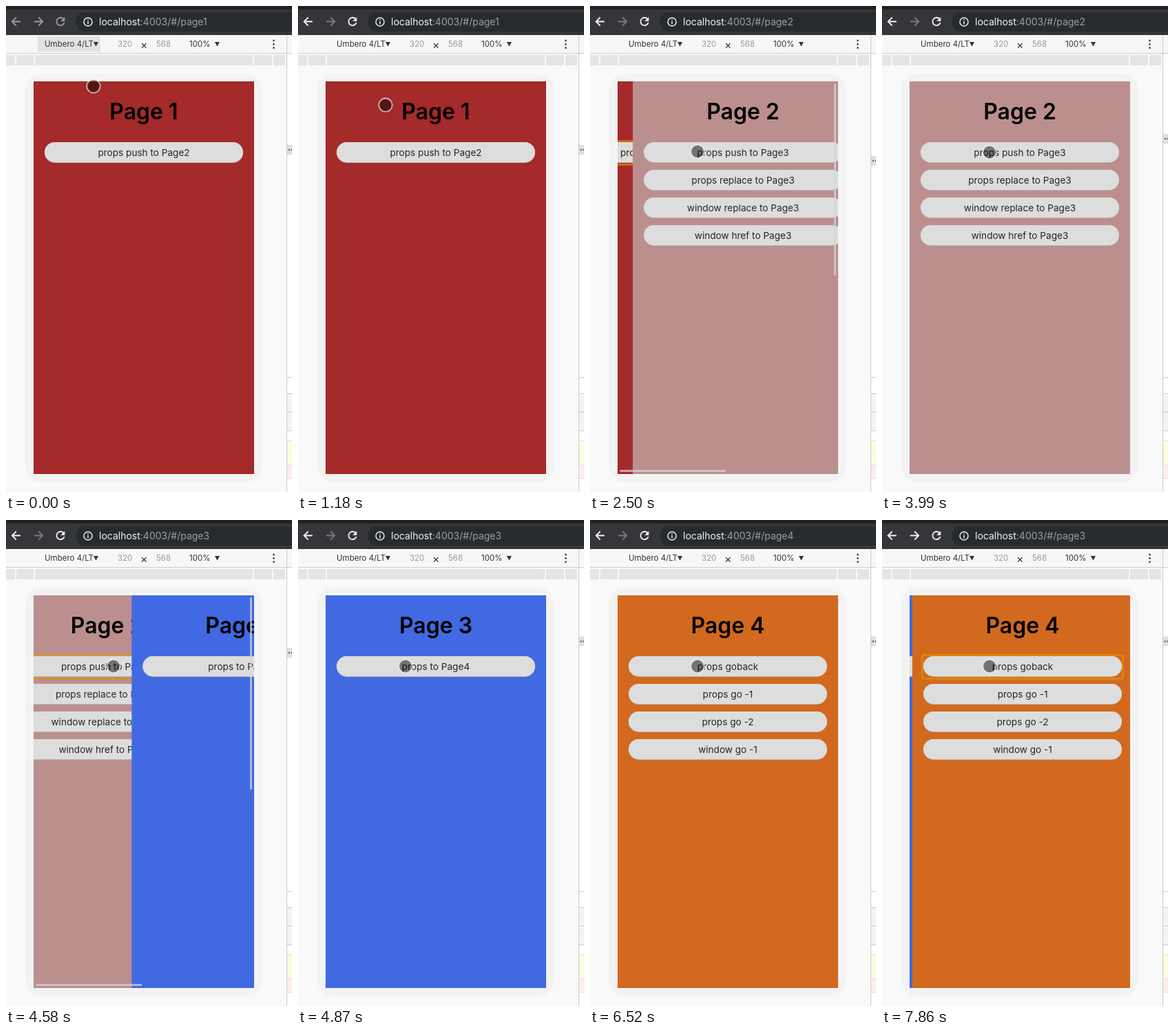
An HTML page that plays this animation: 415x703 px, repeating every 8000 ms.

```html
<!DOCTYPE html>
<html lang="en">
<head>
<meta charset="utf-8">
<title>Page transitions</title>
<style>
  html, body { margin: 0; width: 100%; height: 100%; overflow: hidden; background: #f9f9f9; }
  svg { display: block; width: 415px; height: 703px; font-family: Inter, "Open Sans", sans-serif; }
  .icon { fill: none; stroke: currentColor; stroke-width: 1.8; }
  .url { font-size: 14px; fill: #f1f3f4; }
  .url .path { fill: #9aa0a6; }
  .bar { font-size: 11.5px; fill: #333; }
  .bar .dim { fill: #9a9a9a; }
  h1, .title { font-size: 32px; font-weight: 600; text-anchor: middle; }
  .label { font-size: 13.6px; text-anchor: middle; fill: #262626; }
  .ring { fill: none; stroke: #e59700; stroke-opacity: .62; stroke-width: 3; }
</style>
</head>
<body>
<svg viewBox="0 0 415 703">
  <defs><clipPath id="screen"><rect x="40" y="109" width="320" height="568"/></clipPath></defs>

  <!-- browser toolbar -->
  <rect width="415" height="42" fill="#35363a"/>
  <rect width="415" height="5" fill="#202124"/>
  <rect x="101" y="9" width="340" height="28" rx="14" fill="#282b2e"/>
  <path id="back" class="icon" d="M21 22.5H9M14.8 16.5l-6 6 6 6"/>
  <path id="forward" class="icon" d="M41 22.5h12M47.2 16.5l6 6-6 6"/>
  <g id="reload">
    <path class="icon" d="M83.4 18.7A5.7 5.7 0 1 0 84.6 24"/>
    <path d="M85.3 16v6h-6z" fill="currentColor"/>
  </g>
  <g fill="none" stroke="#e8eaed" stroke-width="1.5">
    <circle cx="119" cy="23" r="6"/>
    <path d="M119 22v4.5M119 19.3v1.5"/>
  </g>
  <text class="url" x="135" y="28">localhost<tspan class="path">:4003/#/<tspan id="page"></tspan></tspan></text>

  <!-- device bar and ruler -->
  <rect y="42" width="415" height="26" fill="#f7f7f7"/>
  <rect id="hover" x="46" y="44" width="91" height="22" fill="#e3e3e3"/>
  <g class="bar">
    <text x="56" y="59">Umbero 4/LT</text>
    <text class="dim" x="162" y="59">320</text>
    <text x="195" y="62" font-size="16">×</text>
    <text class="dim" x="218" y="59">568</text>
    <text x="266" y="59">100%</text>
    <path d="M127 52h7l-3.5 6.5zM303 52h7l-3.5 6.5z"/>
  </g>
  <g fill="#555">
    <circle cx="388.5" cy="50" r="1.5"/><circle cx="388.5" cy="55.3" r="1.5"/><circle cx="388.5" cy="60.6" r="1.5"/>
  </g>
  <path d="M0 71h13v15H0zM15 71h25v15H15zM42 71h316v15H42zM360 71h26v15H360zM388 71h17v15H388z" fill="#e5e5e5"/>

  <!-- side panel -->
  <rect x="408" y="69" width="7" height="634" fill="#fff"/>
  <path d="M408 560h7v54h-7z" fill="#f3f3f3"/>
  <path d="M408 629h7v34h-7z" fill="#fffbe0"/>
  <path d="M408 663h7v20h-7z" fill="#ffecec"/>
  <path d="M0 68.5h415M407.5 42v661M408 537.5h7M408 560.5h7M408 587.5h7M408 614.5h7" stroke="#ccc"/>
  <path d="M408 628.5h7M408 663.5h7M408 683.5h7" stroke="#eee0d0"/>
  <g id="dots">
    <rect x="408" y="-7" width="7" height="14" fill="#dedede"/>
    <circle cx="410.8" r="1.2" fill="#666"/><circle cx="414.6" r="1.2" fill="#666"/>
  </g>

  <!-- device -->
  <rect x="28" y="98" width="343.5" height="591" rx="23" fill="#f3f3f3"/>
  <g clip-path="url(#screen)">
    <g id="pages"></g>
    <g id="bars" fill="#d4d6da" fill-opacity=".72">
      <rect x="354" y="112" width="3" height="278" rx="1"/>
      <rect x="43" y="671" width="154" height="3" rx="1"/>
    </g>
  </g>
  <circle id="cursor" r="9.7" fill="#000" fill-opacity=".48" stroke="#fff" stroke-opacity=".65" stroke-width="1.8"/>
</svg>
<script>
const $ = id => document.getElementById(id);
const LOOP = 8000, STEP = 145, SLIDE = 400;

const screens = [
  ['#a52a2a', 'props push to Page2'],
  ['#bc8f8f', 'props push to Page3', 'props replace to Page3', 'window replace to Page3', 'window href to Page3'],
  ['#4169e1', 'props to Page4'],
  ['#d2691e', 'props goback', 'props go -1', 'props go -2', 'window go -1']
];

// at: first visible change; start: origin of the easing
const moves = [
  { at: 2350, start: 2207, from: 0, to: 1 },
  { at: 4580, start: 4452, from: 1, to: 2 },
  { at: 6070, start: 6070, from: 2, to: 3 },
  { at: 7860, start: 7857.6, from: 3, to: 2 }
];

const button = (label, i) => {
  const y = 197 + 40 * i;
  return `<rect x="56" y="${y}" width="288" height="30" rx="15" fill="#b4b4b4"/>
    <rect x="56" y="${y}" width="288" height="29" rx="14.5" fill="#ddd"/>
    <text class="label" x="200" y="${y + 20}">${label}</text>`;
};

$('pages').innerHTML = screens.map(([color, ...labels], i) => `<g>
  <rect x="40" y="109" width="320" height="568" fill="${color}"/>
  <text class="title" x="200" y="164">Page ${i + 1}</text>
  ${labels.map(button).join('')}
  <rect class="ring" x="54.5" y="195.5" width="291" height="34" rx="2"/></g>`).join('');
const pages = [...$('pages').children];
const rings = pages.map(p => p.querySelector('.ring'));

const show = (el, on) => el.setAttribute('visibility', on ? 'inherit' : 'hidden');
const ease = p => 1 - (1 - p) ** 2.1;
const hold = (t, from) => from + Math.floor((t - from) / STEP) * STEP;

function cursorAt(t) {
  if (t < 150) return [127, 116];
  if (t < 450) return [127, 122];
  if (t >= 3990) return [156, 211.5];
  const s = hold(t, 450);
  if (s < 1470) return [127, 124 + 27 * (s - 450) / 1020];
  const p = Math.min(1, (s - 1465) / 720);
  const k = p * p * (3 - 2 * p);
  return [127 + 29 * k, 151 + 59.5 * k];
}

function draw(t) {
  const move = moves.findLast(m => t >= m.at);
  const p = move ? Math.min(1, (hold(t, move.at) - move.start) / SLIDE) : 1;
  const depth = move ? move.from + (move.to - move.from) * ease(p) : 0;
  const sliding = p < 1;

  pages.forEach((page, i) => {
    const d = i - depth;
    page.setAttribute('transform', `translate(${d > 0 ? 320 * d : 96 * d})`);
    show(page, Math.abs(d) < 1);
    show(rings[i], Math.abs(d) < 1 && sliding && i === move.from);
  });
  show($('bars'), sliding && move.to > move.from);

  $('page').textContent = 'page' + ((move ? move.to : 0) + 1);
  const ready = t < 150 ? '#9a9c9f' : '#f1f3f4';
  $('back').style.color = $('reload').style.color = ready;
  $('forward').style.color = t < 150 ? '#9a9c9f' : t < 7860 ? '#797b7e' : '#f1f3f4';
  show($('hover'), t < 450);
  const y = t < 2350 ? 208 : t < 2790 ? 224 : t < 4725 ? 192 : 175.5;
  $('dots').setAttribute('transform', `translate(0 ${y})`);
  $('cursor').setAttribute('transform', `translate(${cursorAt(t)})`);
}

const origin = performance.now();
(function tick() {
  draw((performance.now() - origin) % LOOP);
  requestAnimationFrame(tick);
})();
</script>
</body>
</html>
```
